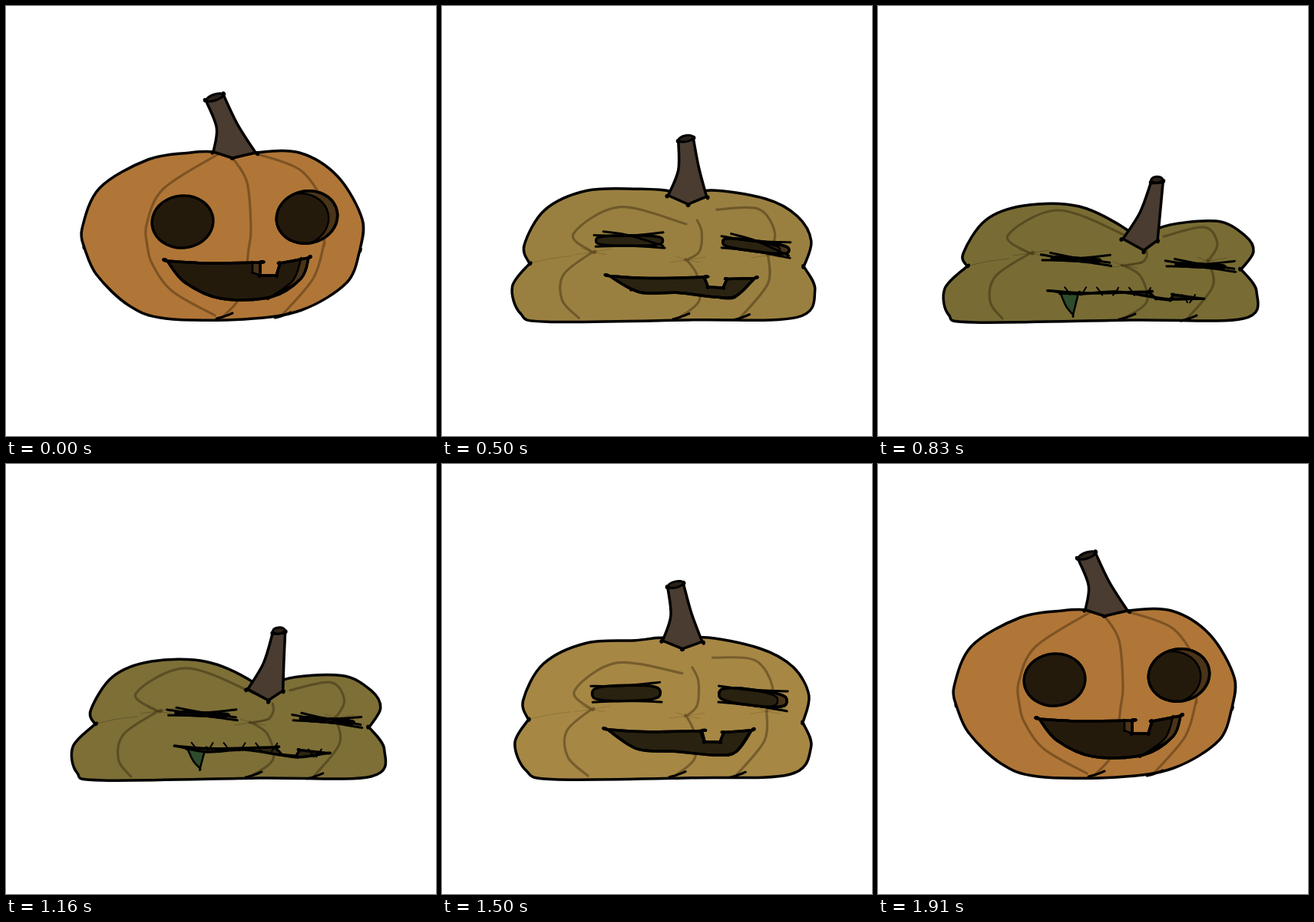
An HTML page with a canvas that plays this animation: 560x560 px, repeating every 2000 ms.

```html
<!DOCTYPE html>
<html lang="en">
<head>
<meta charset="utf-8">
<title>Sagging pumpkin</title>
<style>
  html, body { margin: 0; width: 100%; height: 100%; overflow: hidden; background: #fff; }
  canvas { display: block; width: 560px; height: 560px; }
</style>
</head>
<body>
<canvas id="stage" width="560" height="560"></canvas>
<script>
const ctx = document.getElementById('stage').getContext('2d');
const STEPS = 24, LOOP = 2000;

// Each part runs from a fresh outline to a collapsed one (x,y pairs).
const crown = [[270,190, 295,198, 325,191], [327,293, 346,318, 366,289]];
const rightTop = [[382,191, 432,222, 464,278], [440,280, 478,299, 489,320]];
const lobes = [
  [461,318, 444,360, 385,396, 310,408, 208,407, 160,390, 118,350, 102,315],
  [473,343, 493,372, 476,407, 330,409, 125,412, 92,402, 87,368, 116,339]];
const leftTop = [[99,290, 122,237, 185,200, 240,191], [111,322, 140,279, 190,260, 262,261]];
const ribLeft = [
  [278,192, 205,238, 183,285, 184,312, 190,335, 216,371, 272,403],
  [325,300, 235,266, 169,299, 198,322, 153,352, 146,385, 162,407]];
const ribMid = [
  [296,199, 314,230, 319,290, 316,316, 312,348, 303,382, 282,405],
  [350,318, 350,326, 343,334, 320,338, 342,352, 350,385, 322,406]];
const ribRight = [
  [328,193, 385,215, 416,265, 414,310, 400,355, 358,404],
  [372,300, 425,288, 442,310, 430,332, 436,365, 402,408]];
const lip = [
  [210,332, 265,335, 331,334, 331,351, 352,351, 357,335, 394,328],
  [226,371, 274,374, 352,372, 362,381, 380,383, 385,376, 420,381]];
const jaw = [[384,355, 345,379, 280,381, 233,360], [382,382, 358,379, 310,372, 262,375]];

const lerp = (a, b, t) => a + (b - a) * t;
const blend = (a, b, t) => a.map((v, i) => lerp(v, b[i], t));
const move = ([x, y], dx, dy = 0) => [x + dx, y + dy];
const rgb = list => `rgb(${list.map(Math.round)})`;

function points([from, to], t) {
  const flat = blend(from, to, t);
  return Array.from({ length: flat.length / 2 }, (_, i) => flat.slice(2 * i, 2 * i + 2));
}

// Smooth curve through points; listed indices stay sharp.
function curve(list, closed, corners = []) {
  const pts = list.flatMap((p, i) => corners.includes(i) ? [p, p] : [p]);
  const n = pts.length;
  const at = i => closed ? pts[(i + n) % n] : pts[Math.max(0, Math.min(n - 1, i))];
  const path = new Path2D();
  path.moveTo(...pts[0]);
  for (let i = 0; i < (closed ? n : n - 1); i++) {
    const [a, b, c, d] = [at(i - 1), at(i), at(i + 1), at(i + 2)];
    path.bezierCurveTo(b[0] + (c[0] - a[0]) / 6, b[1] + (c[1] - a[1]) / 6,
      c[0] - (d[0] - b[0]) / 6, c[1] - (d[1] - b[1]) / 6, c[0], c[1]);
  }
  if (closed) path.closePath();
  return path;
}

const line = (...pts) => curve(pts, false);

function ink(path, width = 3.5, color = '#000') {
  ctx.lineWidth = width;
  ctx.strokeStyle = color;
  ctx.stroke(path);
}

function shape(path, fill, width) {
  ctx.fillStyle = fill;
  ctx.fill(path);
  ink(path, width);
}

// Three rates of collapse: sag is even, droop starts late, shut starts early.
function stateAt(step) {
  const sag = 1.03 * Math.sin(Math.PI * step / (STEPS - 1)) ** 1.35;
  return { sag, droop: sag ** 1.75, shut: 1 - Math.max(0, 1 - sag) ** 1.7 };
}

function skin(sag) {
  const fresh = [176, 118, 55], pale = [172, 138, 70], rotten = [120, 108, 52];
  return rgb(sag < .5 ? blend(fresh, pale, sag * 2) : blend(pale, rotten, sag * 2 - 1));
}

function drawBody({ sag, droop, shut }) {
  const [left, cleft, right] = points(crown, droop);
  const low = points(lobes, shut);
  const outline = [cleft, right, ...points(rightTop, sag), ...low, ...points(leftTop, sag), left];
  const body = curve(outline, true, [0, 5, 12]);
  ctx.fillStyle = skin(sag);
  ctx.fill(body);

  const shade = 'rgba(35,22,5,.36)';
  const ribs = [points(ribLeft, shut), points(ribMid, sag), points(ribRight, sag)];
  const faint = `rgba(35,22,5,${.28 * Math.min(1, sag)})`;
  for (const rib of ribs) {
    ink(curve(rib, false, [3]), 3.2, shade);
    const pinch = rib[3];
    ink(line(move(pinch, -22, 3), pinch, move(pinch, 24, -4)), 1, faint);
    ink(line(move(pinch, -14, -5), pinch, move(pinch, 18, 3)), 1, faint);
  }
  const notch = low[low.length - 1];
  ink(line(notch, move(notch, 25, -6), move(notch, 55, -10)), 1, faint);
  ink(body);

  for (const rib of ribs.slice(1)) {
    const end = rib[rib.length - 1];
    ink(line(move(end, 13, -5), end, move(end, -8, 2)), 3);
  }
}

function drawStem({ droop }) {
  const [left, cleft, right] = points(crown, droop);
  const base = [move(left, -8 * droop, 10 * droop), move(right, -2 * droop, 16 * droop)];
  const top = [lerp(272, 363, droop), lerp(120, 230, droop)];
  const half = lerp(12, 8, droop), tilt = lerp(-.33, -.06, droop);
  const dx = half * Math.cos(tilt), dy = half * Math.sin(tilt);
  const ends = [move(top, -dx, -dy), move(top, dx, dy)];
  const bendL = move(blend(base[0], ends[0], .5), lerp(9, 4, droop), 2);
  const bendR = move(blend(base[1], ends[1], .5), lerp(-3, 0, droop));
  shape(curve([base[0], bendL, ...ends, bendR, base[1], cleft], true, [0, 2, 3, 5, 6]), '#4a3c30');
  const cap = new Path2D();
  cap.ellipse(top[0], top[1] - lerp(1, 4, droop), half - .5, 4, tilt, 0, 2 * Math.PI);
  shape(cap, '#2a221a', 3);
}

// Rounded when open, boxy as it shuts.
function eyePath(rx, ry, shut) {
  const power = 1 - .45 * shut;
  const bend = v => Math.sign(v) * Math.abs(v) ** power;
  const pts = Array.from({ length: 20 }, (_, i) => {
    const a = i * Math.PI / 10;
    return [rx * bend(Math.cos(a)), ry * bend(Math.sin(a))];
  });
  return curve(pts, true);
}

function drawEye([x, y], tilt, { sag, shut }, rim, dark, side) {
  const rx = 40 + 8 * shut - 16 * sag ** 4, ry = 2 + 32 * (1 - Math.min(1, shut));
  const hole = eyePath(rx, ry, shut);
  ctx.save();
  ctx.translate(x, y);
  ctx.rotate(tilt);
  shape(hole, rim ? side : dark);
  if (rim) {
    ctx.save();
    ctx.clip(hole);
    ctx.translate(-rim, 1);
    shape(hole, dark, 2.5);
    ctx.restore();
    ink(hole);
  }
  if (sag > .1) {
    ink(line([-46, -ry - 5 * sag + 3], [-6, -ry + sag], [44, -ry - 6 * sag]), 3);
    ink(line([-44, ry + 1], [0, ry], [46, ry + 4 * sag]), 3);
    if (sag > .6) ink(line([-34, -ry - 5], [0, -ry], [44, ry]), 3);
  }
  ctx.restore();
}

function drawMouth({ sag, droop, shut }, dark, side) {
  const upper = points(lip, droop), lower = points(jaw, shut);
  const sharp = [0, 2, 3, 4, 5, 6];
  const mouth = curve([...upper, ...lower], true, sharp);
  const [corner, , tooth, toothEnd] = upper, end = upper[6];

  if (sag > .45) {
    const root = move(corner, 12, 4);
    const drip = [root, move(root, 23, -1), move(root, 16, 27 * droop), move(root, 7, 16 * droop)];
    shape(curve(drip, true, [0, 1, 2]), '#2e4c2b', 2.5);
  }
  shape(mouth, dark);

  if (shut < .9) {
    const w = 10 * (1 - shut);
    shape(curve([end, lower[0], lower[1], move(lower[0], -w, 2), move(end, -w, 2)], true, [0, 2, 4]), side, 2.5);
    shape(curve([tooth, toothEnd, move(toothEnd, -w, -4), move(tooth, -w)], true, [0, 1, 2, 3]), side, 2.5);
    ink(mouth);
  }
  if (sag > .77) {
    for (let i = 1; i < 9; i++) {
      const p = i < 7 ? blend(corner, tooth, i / 6) : move(end, 10 * (i - 9));
      const s = i % 2 ? 5 : -5;
      ink(line(move(p, -4, -s), p, move(p, 3, s)), 2);
    }
  }
}

function draw(step) {
  const state = stateAt(step), { sag, droop, shut } = state;
  const dark = rgb(blend([36, 26, 12], [43, 37, 18], shut)), side = '#4a3419';
  ctx.fillStyle = '#fff';
  ctx.fillRect(0, 0, 560, 560);
  ctx.lineCap = ctx.lineJoin = 'round';
  drawBody(state);
  drawStem(state);
  drawEye(blend([230, 281], [258, 330], droop), -.1 + .15 * sag, state, 0, dark, side);
  drawEye(blend([392, 275], [420, 338], sag ** 1.3), -.2 + .55 * shut - .3 * sag ** 2, state, 12, dark, side);
  drawMouth(state, dark, side);
}

// Steps change on whole hundredths of a second.
const start = performance.now();
let shown = -1;
function tick() {
  const hundredths = Math.floor(Math.max(0, performance.now() - start) % LOOP / 10);
  const step = Math.ceil((hundredths + 1) * STEPS / (LOOP / 10)) - 1;
  if (step !== shown) draw(shown = step);
  requestAnimationFrame(tick);
}
tick();
</script>
</body>
</html>
```
